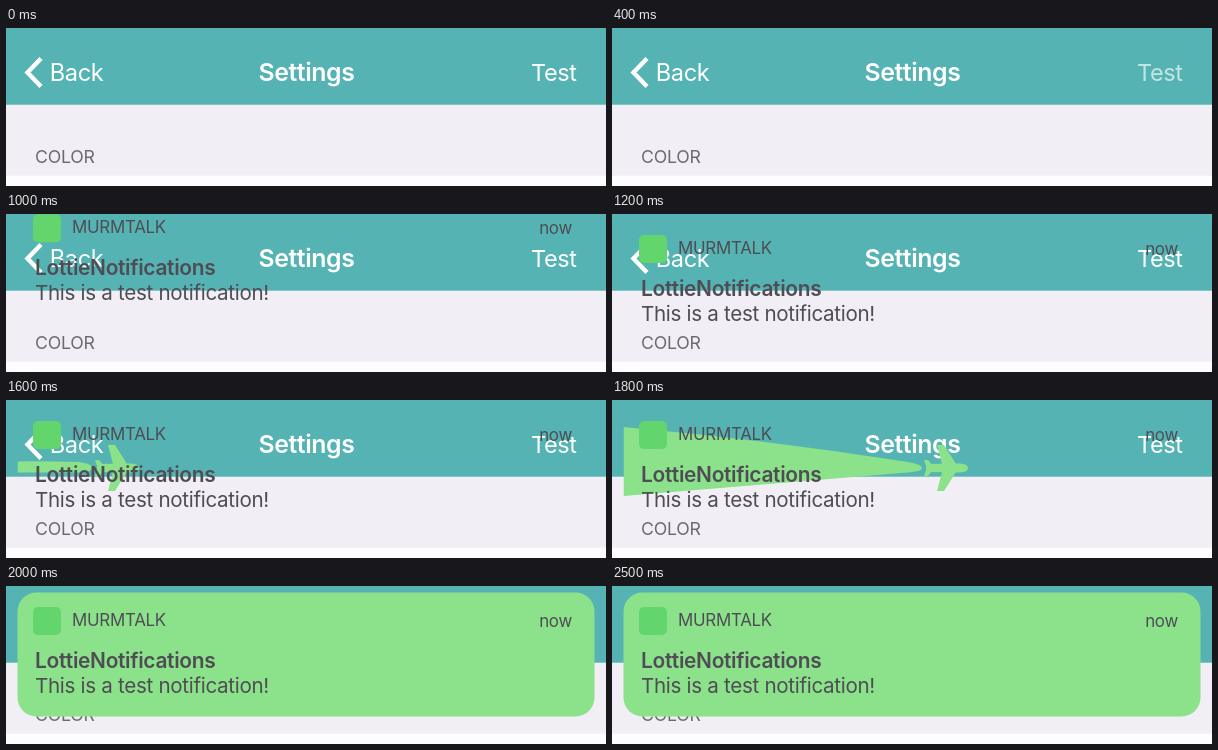
Write an HTML page with a canvas that moves like this. It is 600 by 158 pixels and loops after 2.6 s.

```html
<!DOCTYPE html>
<html lang="en">
<head>
<meta charset="utf-8">
<title>Notification banner</title>
<style>
  html, body { margin: 0; width: 100%; height: 100%; overflow: hidden; background: #fefcfe; }
  canvas { display: block; width: 600px; height: 158px; }
</style>
</head>
<body>
<canvas id="stage" width="600" height="158"></canvas>
<script>
const ctx = document.getElementById('stage').getContext('2d');
const LOOP = 2600, STEP = 100;
const GREEN = '#8be28a', INK = '#4f4d54';
const CARD = { x: 11.5, y: 6.5, w: 577, h: 124, r: 19 };
const MID = 68;

const clamp = v => Math.max(0, Math.min(1, v));
const progress = (t, from, to) => clamp((t - from) / (to - from));
const mix = (a, b, p) => a + (b - a) * p;

function text(str, x, y, size, color, weight = 400, align = 'left') {
  ctx.font = `${weight} ${size}px Inter, sans-serif`;
  ctx.letterSpacing = `${-0.015 * size}px`;
  ctx.textAlign = align;
  ctx.fillStyle = color;
  ctx.fillText(str, x, y);
}

function box(x, y, w, h, r) {
  ctx.beginPath();
  ctx.roundRect(x, y, w, h, r);
}

function polygon(points) {
  ctx.beginPath();
  points.forEach(([x, y]) => ctx.lineTo(x, y));
  ctx.closePath();
  ctx.fill();
}

function drawScreen(t) {
  ctx.fillStyle = '#fefcfe';
  ctx.fillRect(0, 0, 600, 158);
  ctx.fillStyle = '#f1eff5';
  ctx.fillRect(0, 0, 600, 147.7);
  ctx.fillStyle = '#55b3b4';
  ctx.fillRect(0, 0, 600, 76.7);

  ctx.strokeStyle = '#fff';
  ctx.lineWidth = 4.4;
  ctx.beginPath();
  ctx.moveTo(35, 30.5);
  ctx.lineTo(21.5, 44.5);
  ctx.lineTo(35, 58.5);
  ctx.stroke();

  text('Back', 43.7, 53, 23.6, '#fff');
  text('Settings', 300.5, 53, 24.8, '#fff', 600, 'center');
  // The tapped button dims at once and fades back.
  ctx.globalAlpha = t < 100 ? 1 : mix(0.25, 1, progress(t, 100, 650));
  text('Test', 570.7, 53, 23.5, '#fff', 400, 'right');
  ctx.globalAlpha = 1;
  text('COLOR', 29, 135, 17.7, '#6c6a71');
}

function drawTrail(t, end) {
  const left = 5.5 * Math.pow((t - 1500) / 100, 1.67);
  const tip = t <= 1800 ? 4.5 : 9;
  const center = MID - left * 0.19;
  const top = center - left, shoulder = MID - tip - 1.5;
  const bulge = left * 0.14;
  ctx.beginPath();
  ctx.moveTo(CARD.x, top);
  ctx.quadraticCurveTo((CARD.x + end - 14) / 2, (top + shoulder) / 2 - bulge, end - 14, shoulder);
  ctx.quadraticCurveTo(end, MID - tip + 1, end, MID);
  ctx.quadraticCurveTo(end, MID + tip - 1, end - 14, MID + tip);
  ctx.lineTo(CARD.x, center + left);
  ctx.fill();
}

function drawPlane(nose) {
  ctx.save();
  ctx.translate(nose, MID);
  ctx.beginPath();
  ctx.moveTo(-42, -4);
  ctx.lineTo(-8, -4.5);
  ctx.quadraticCurveTo(0, -4, 0, 0);
  ctx.quadraticCurveTo(0, 4, -8, 4.5);
  ctx.lineTo(-42, 4);
  ctx.fill();
  for (const side of [-1, 1]) {
    polygon([[-31, 23 * side], [-24, 23 * side], [-12, 4 * side], [-26, 4 * side]]);
    polygon([[-44, 8 * side], [-40, 8 * side], [-35, 2 * side], [-42, 2 * side]]);
  }
  ctx.restore();
}

function drawFill(t) {
  if (t < 1500) return;
  ctx.save();
  box(CARD.x, CARD.y, CARD.w, CARD.h, CARD.r);
  ctx.fillStyle = GREEN;
  if (t >= 2000) {
    ctx.fill();
  } else {
    ctx.clip();
    const nose = 133 + 1.115 * (t - 1600);
    if (t > 1500) drawTrail(t, nose - 46);
    drawPlane(nose);
  }
  ctx.restore();
}

function drawContent(t) {
  if (t <= 700) return;
  ctx.save();
  ctx.translate(0, -130 * (1 - progress(t, 700, 1200)) ** 2);
  ctx.fillStyle = '#63d56d';
  box(27, 21, 28, 28, 5);
  ctx.fill();
  text('MURMTALK', 66, 40, 16.9, INK);
  text('now', 566, 40.5, 16.9, INK, 400, 'right');
  text('LottieNotifications', 29, 81.6, 20.9, INK, 600);
  text('This is a test notification!', 29, 107.2, 20.6, INK);
  ctx.restore();
}

function render(now) {
  const t = Math.floor((now % LOOP) / STEP) * STEP;
  drawScreen(t);
  drawFill(t);
  drawContent(t);
}

let start;
function tick(now) {
  start ??= now;
  render(now - start);
  requestAnimationFrame(tick);
}
render(0);
requestAnimationFrame(tick);
</script>
</body>
</html>
```
